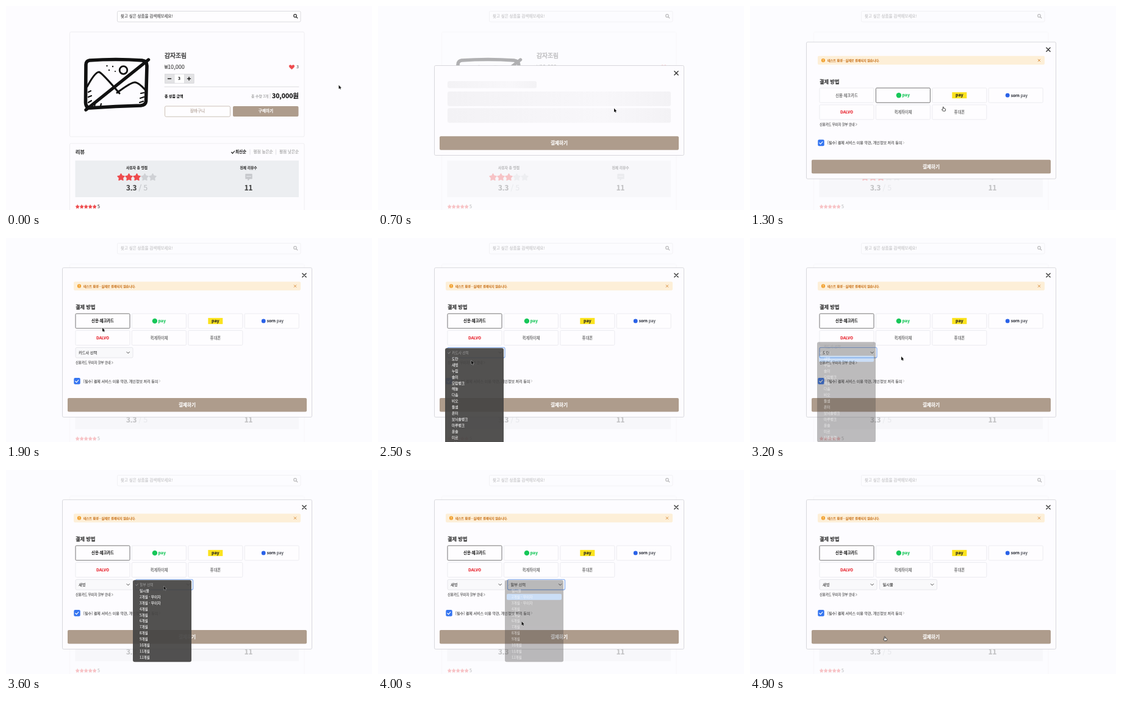
An HTML page for the animation above (5000 ms loop, 600x334 px).

```html
<!DOCTYPE html>
<html lang="ko">
<head>
<meta charset="utf-8">
<style>
html, body { margin: 0; width: 100%; height: 100%; overflow: hidden; background: #fdfcff; }
svg { display: block; width: 600px; height: 334px; font-family: "Noto Sans CJK KR", "Noto Sans CJK", "Noto Sans CJK JP", "Noto Sans", sans-serif; }
text { white-space: pre; }
.soft { filter: blur(0.4px); }
</style>
</head>
<body>
<svg id="stage" viewBox="0 0 600 334"></svg>
<script>
const LOOP = 5000, STEP = 100;
const TAN = '#ae9c8c', RED = '#ee4a4d', BLUE = '#3575f0', PAPER = '#fdfcff', ROW = 9.93;

// y is the vertical centre of the glyphs; a thin outline gives the medium weight
const text = (s, x, y, size, fill = '#444', weight = 400, anchor = 'start') =>
  `<text x="${x}" y="${y + size * 0.37}" font-size="${size}" fill="${fill}" font-weight="${weight}" text-anchor="${anchor}" stroke="${fill}" stroke-width="${size * (weight === 500 ? 0.045 : 0.015)}">${s}</text>`;
const mid = (s, x, y, size, fill, weight) => text(s, x, y, size, fill, weight, 'middle');
const rect = (x, y, w, h, fill, stroke = 'none', r = 0, sw = 0.8) =>
  `<rect x="${x}" y="${y}" width="${w}" height="${h}" rx="${r}" fill="${fill}" stroke="${stroke}" stroke-width="${sw}"/>`;
const line = (d, stroke, w = 1, fill = 'none') =>
  `<path d="${d}" stroke="${stroke}" stroke-width="${w}" fill="${fill}" stroke-linecap="round" stroke-linejoin="round"/>`;
const dot = (x, y, r, fill) => `<circle cx="${x}" cy="${y}" r="${r}" fill="${fill}"/>`;
const ring = (x, y, r, stroke, w) => `<circle cx="${x}" cy="${y}" r="${r}" fill="none" stroke="${stroke}" stroke-width="${w}"/>`;
const fade = (alpha, s) => `<g opacity="${alpha}">${s}</g>`;
const cross = (x, y, r, color, w) => line(`M${x - r} ${y - r}l${2 * r} ${2 * r}m0 ${-2 * r}l${-2 * r} ${2 * r}`, color, w);
const check = (x, y, color, w, k = 1) => line(`M${x - 2.4 * k} ${y}l${1.8 * k} ${1.9 * k}l${3.2 * k} ${-3.8 * k}`, color, w);

function star(x, y, r, fill) {
  let d = '';
  for (let i = 0; i < 10; i++) {
    const a = (i / 5 - 0.5) * Math.PI, q = i % 2 ? r * 0.52 : r;
    d += (i ? 'L' : 'M') + (x + q * Math.cos(a)).toFixed(2) + ' ' + (y + q * Math.sin(a)).toFixed(2);
  }
  return line(d + 'Z', fill, r * 0.28, fill);
}

function picture() {
  const ink = '#111';
  return '<g class="soft">'
    + line('M137 89Q180 86 223 89Q231 90 231 98L229.500 156Q229 162 221 163Q180 164 138 167Q131 167 130.500 158L131 96Q131 90 137 89Z', ink, 5.6)
    + line('M133 132Q146 108 152.500 108Q158 110 186 143M182 142Q206 124 212 125Q218 126 228 137', ink, 3)
    + line('M135 141l4-2m-4 10l5-2m-5 11l5-3m5 10l1-5m9 4l1-4M226 142l-5 1m5 6l-6 2m5 5l-6 2', ink, 2.2)
    + ring(192.5, 105, 6.3, ink, 2.8)
    + dot(165.5, 98, 1.2, ink) + dot(175, 99, 1.2, ink) + dot(169, 105, 1.2, ink) + dot(179, 107, 1.1, ink)
    + line('M131 170L233.500 88', ink, 5.4) + '</g>';
}

function shop() {
  const edge = '#ebeaee', soft = '#999';
  let s = rect(182.5, 8.5, 300.5, 17.5, '#fefdff', '#d3d3d7', 2)
    + text('찾고 싶은 상품을 검색해보세요!', 188, 16.5, 6.5, '#444')
    + ring(474, 16, 2.3, '#333', 1.2) + line('M476 18l1.800 1.800', '#333', 1.3)
    + rect(104.5, 42.5, 384.5, 171.5, 'none', edge, 2) + picture()
    + text('감자조림', 260, 81, 9.8, '#3c3c3c', 500) + text('₩10,000', 260, 99.5, 9.1, '#444')
    + line('M468.500 103.500C462 99.500 464 96.200 466.500 96.500Q468 97 468.500 98Q469 97 470.500 96.500C473 96.200 475 99.500 468.500 103.500Z', RED, 0.4, RED)
    + text('3', 480, 99.5, 6.6, '#555', 400, 'end')
    + rect(260.5, 111.5, 47.5, 15, '#fff', '#d8d8db', 1)
    + rect(260.5, 111.5, 15.5, 15, '#e3e3e5', '#d8d8db') + rect(292.5, 111.5, 15.5, 15, '#e3e3e5', '#d8d8db')
    + line('M265.500 119h5M297.500 119h5m-2.500-2.500v5', '#222', 1.5)
    + mid('3', 284, 119, 6.6, '#111', 700)
    + line('M260 132.300H480', '#d6d5d9', 0.8)
    + text('총 상품 금액', 260, 147.5, 5.9, '#111', 700)
    + text('총 수량 3개', 402, 147.5, 5.9, soft) + line('M433 143.500v8', '#ccc', 0.7)
    + text('30,000원', 480, 147.2, 10.5, '#111', 700, 'end')
    + rect(260.5, 164, 107, 17.2, '#fefdff', '#c1b3a6', 2) + mid('장바구니', 314, 172, 6.6, '#a8978a')
    + rect(372, 164, 107.5, 17, TAN, 'none', 2) + mid('구매하기', 426, 172, 6.6, '#fff', 700)
    + rect(104.5, 225, 384.5, 180, 'none', edge, 2)
    + text('리뷰', 114, 239, 8.1, '#333', 500)
    + check(372, 239.5, '#222', 1.2) + text('최신순', 376, 239, 6.5, '#222', 700)
    + line('M400 235v8M442.500 235v8', '#d5d5d8', 0.7)
    + text('평점 높은순', 405.5, 239, 6.6, soft) + text('평점 낮은순', 448, 239, 6.6, soft)
    + rect(113.5, 253, 366.5, 60, '#eceef1')
    + mid('사용자 총 평점', 214.5, 265, 5.8, '#333', 700) + mid('전체 리뷰수', 397.5, 265, 5.7, '#333', 700)
    + text('3.3', 197, 298, 11.6, '#444', 700) + text('/ 5', 217.5, 298, 11.8, '#bfc1c5')
    + mid('11', 397.5, 298, 11.6, '#444', 700)
    + line('M393 275.500h10v7h-4l-2 2.500v-2.500h-4Z', '#c6c8cc', 1.4, '#c6c8cc')
    + line('M394.500 279h7', '#eceef1', 1);
  for (let i = 0; i < 5; i++)
    s += star(188.5 + 13 * i, 280.5, 5.7, i < 3 ? RED : '#cfd1d5') + star(117.2 + 7 * i, 328.8, 3, RED);
  return s + text('5', 150, 328.5, 7, '#333');
}

const SHOP = shop();

function methods(top, pick) {
  let s = '';
  for (let i = 0; i < 7; i++) {
    const x = 114 + 92.4 * (i % 4), y = top + 75.2 + (i > 3 ? 27.6 : 0), on = i === pick;
    const cx = x + 44.5, cy = y + 12, label = t => mid(t, cx, cy, 6.3, on ? '#222' : '#555', on ? 700 : 400);
    s += rect(x, y, 89, 24, '#fefdff', on ? '#666' : '#e8e8ec', 1.5, on ? 0.9 : 0.8);
    s += [
      () => label('신용·체크카드'),
      () => dot(cx - 7, cy, 4.2, '#17c759') + text('pay', cx - 1.5, cy - 0.5, 7, '#17c759', 700),
      () => rect(cx - 12, cy - 5, 24, 10, '#fbe31e') + mid('pay', cx, cy - 0.5, 7, '#222', 700),
      () => dot(cx - 13.5, cy, 3.4, '#2a62e8') + text('sorn <tspan font-weight="400">pay</tspan>', cx - 8, cy, 6.5, '#2b2f38', 700),
      () => mid('DALVO', cx, cy, 6.5, '#e8232d', 900),
      () => label('퀵계좌이체'),
      () => label('휴대폰')
    ][i]();
  }
  return s;
}

const select = (x, y, label, focus) => rect(x, y, 94, 16.8, '#f9f9fb', focus ? '#7ba6ee' : '#e2e2e7', 2, focus ? 1.1 : 0.8)
  + text(label, x + 5, y + 8.3, 6.2, '#333') + line(`M${x + 84} ${y + 7.3}l2.200 2.200l2.200-2.200`, '#444', 1);

function skeleton(t) {
  const p = (t % 1000) / 1000;
  return `<defs><linearGradient id="sheen"><stop offset="0" stop-color="#f3f2f5"/><stop offset="${p}" stop-color="#f8f7fa"/><stop offset="1" stop-color="#f3f2f5"/></linearGradient></defs>`
    + rect(114, 123, 146, 11.5, 'url(#sheen)', 'none', 3)
    + rect(114, 140, 366, 24, 'url(#sheen)', 'none', 3) + rect(114, 167.3, 366, 24, 'url(#sheen)', 'none', 3);
}

function form(t, top, card) {
  const low = top + (card ? 20.6 : 0);
  let s = rect(111, top + 22.8, 372, 14.2, '#fdefd8', 'none', 2)
    + dot(120, top + 30, 3.1, '#f2a02c') + line(`M120 ${top + 28.5}v1.500m0 1.500v.1`, '#fff', 0.8)
    + text('테스트 환경 - 실제로 결제되지 않습니다.', 127, top + 30, 5.1, '#c9721a', 500)
    + cross(474, top + 30, 1.8, '#d17d22', 0.8)
    + text('결제 방법', 114, top + 64.7, 8.2, '#333', 500)
    + methods(top, t >= 1800 ? 0 : 1)
    + text('신용카드 무이자 할부 안내', 114, low + 134.8, 5.25, '#444')
    + line(`M173.500 ${low + 133}l1.800 1.800l-1.800 1.800`, '#666', 0.7)
    + rect(111.3, low + 159.8, 10.4, 10.4, BLUE, 'none', 2) + check(116.2, low + 165.2, '#fff', 1.2)
    + text('[필수] 결제 서비스 이용 약관, 개인정보 처리 동의', 127, low + 165, 6, '#444')
    + line(`M251 ${low + 163}l1.800 1.800l-1.800 1.800`, '#aaa', 0.7);
  if (card) {
    const bank = BANKS[t < 2800 ? 0 : t < 3300 ? 1 : 2];
    s += select(114, top + 130.6, bank, t >= 2400 && t < 3400);
    if (t >= 3400) s += select(212.5, top + 130.6, PLANS[t < 4100 ? 0 : t < 4600 ? 2 : 1], t >= 3600 && t < 4700);
  }
  return s;
}

function modal(t) {
  const ready = t >= 1000, card = t >= 1900;
  const top = !ready ? 97.5 : card ? 48.7 : 59, bottom = 342 - top;
  return fade(0.68, rect(0, 0, 600, 334, PAPER))
    + rect(92.5, top, 409, bottom - top, PAPER, '#cfced3', 2)
    + cross(489, top + 12.3, 3.1, '#333', 1.4)
    + (ready ? form(t, top, card) : skeleton(t))
    + rect(101, bottom - 31.2, 392, 22.4, TAN, 'none', 2) + mid('결제하기', 297, bottom - 20, 7.6, '#fff', 700);
}

const BANKS = ['카드사 선택', '도란', '새벗', '누림', '솔미', '모람뱅크', '해늘', '다솜', '비오', '들샘', '온터', '보늬솔뱅크', '마루뱅크', '윤슬', '미르', '저축은행'];
const PLANS = ['할부 선택', '일시불', ...Array.from({ length: 11 }, (_, i) => `${i + 2}개월${i < 2 ? ' - 무이자' : ''}`)];

// list, left, current row, picked row, opens, highlights, fades, closes
const MENUS = [
  [BANKS, 110, 0, 1, 2400, 2600, 2700, 2800],
  [BANKS, 110, 1, 2, 2900, 3000, 3100, 3300],
  [PLANS, 208, 0, 2, 3600, 3800, 3900, 4100],
  [PLANS, 208, 2, 1, 4300, 4400, 4500, 4600]
];

function menu(t) {
  const open = MENUS.find(m => t >= m[4] && t < m[7]);
  if (!open) return '';
  const [list, x, now, pick, , lit, out] = open;
  const top = 180.2 - now * ROW;
  const alpha = t < out ? 0.93 : t === out ? 0.65 : 0.35;
  let labels = '';
  list.forEach((label, i) => {
    const y = top + 7.6 + i * ROW, color = i ? '#fff' : '#9a9a9a';
    if (i === now) labels += check(x + 6.5, y, color, 0.8, 0.8);
    labels += text(label, x + 11, y, 5.7, color);
  });
  const bar = t < lit ? '' : rect(x + 3, top + 2.7 + pick * ROW, 90, ROW, '#6fa8e8', 'none', 2);
  return fade(alpha, rect(x, top, 96, list.length * ROW + 5, '#454443', 'none', 3) + bar)
    + fade(Math.sqrt(alpha), labels);
}

const PATH = [
  [0, 545.5, 129.5], [100, 530, 135], [400, 425, 171], [500, 424, 171], [700, 387, 167.5], [1000, 345, 165],
  [1300, 317, 165], [1700, 160, 147], [1900, 158, 147], [2300, 158, 187], [2400, 156, 189], [2500, 153, 200.5],
  [2700, 153, 198], [2900, 155, 188], [3000, 155, 197], [3100, 175, 198], [3200, 248, 194], [3300, 285, 194],
  [3500, 260, 188], [3700, 257, 192], [3800, 250, 207], [3900, 246, 208], [4000, 235.5, 248], [4200, 252, 189],
  [4300, 250, 187], [4400, 245, 177], [4500, 244, 178], [4800, 221, 272.5], [5000, 221, 272.5]
];

function cursor(t) {
  const i = PATH.findIndex(p => p[0] > t), [t0, x0, y0] = PATH[i - 1], [t1, x1, y1] = PATH[i];
  const k = (t - t0) / (t1 - t0), x = x0 + (x1 - x0) * k, y = y0 + (y1 - y0) * k;
  const hand = (t >= 400 && t < 500) || (t >= 1200 && t < 1900) || t >= 4700;
  const shape = hand
    ? line('M-.9 3.500V.6Q-.2-.6.600.600V2.600L3 3.200Q3.800 3.500 3.600 5L3 7H-.8L-2.600 4.500Q-2.400 3.300-.9 4.500', '#222', 0.8, '#fff')
    : '<path d="M0 0V6.200L1.500 4.900L2.500 7.100L3.500 6.600L2.500 4.500H4.300Z" fill="#111" stroke="#fff" stroke-width=".6" paint-order="stroke"/>';
  return `<g transform="translate(${x} ${y})">${shape}</g>`;
}

const stage = document.getElementById('stage');
let start, shown;
function draw(now) {
  start ??= now;
  const t = Math.floor(((now - start) % LOOP) / STEP) * STEP;
  if (t !== shown) {
    shown = t;
    stage.innerHTML = SHOP + (t >= 500 ? modal(t) : '') + menu(t) + cursor(t);
  }
  requestAnimationFrame(draw);
}
requestAnimationFrame(draw);
</script>
</body>
</html>
```
